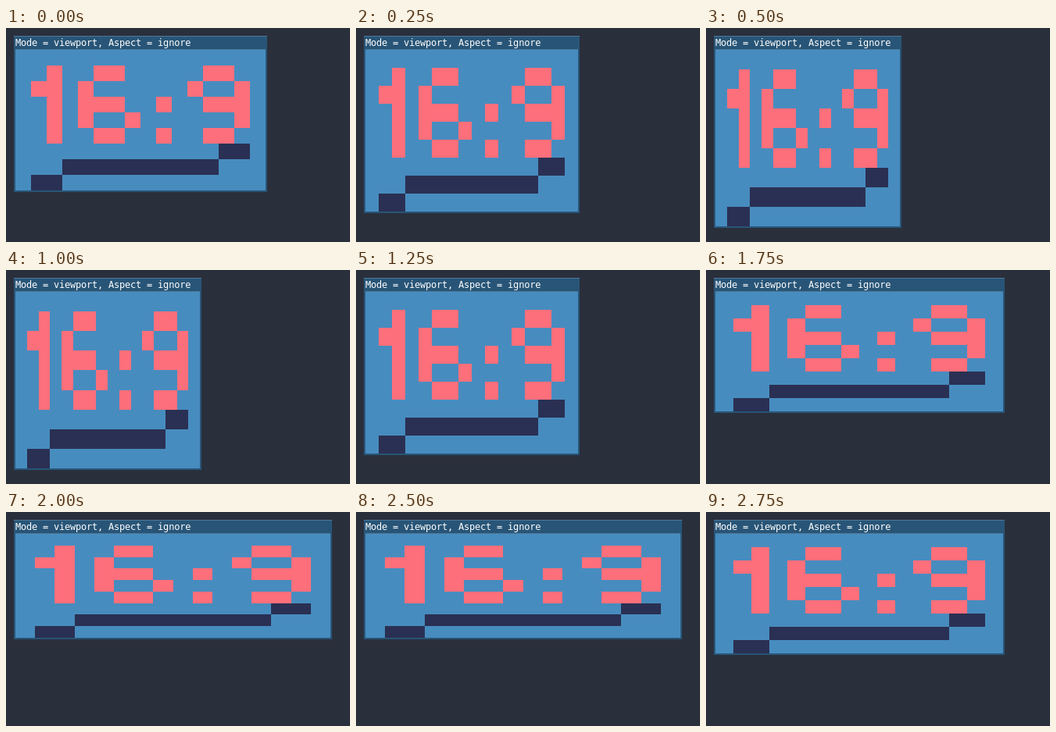
Animation of 440 by 274 pixels, one loop 3 s. Source, as an HTML page with a canvas:

```html
<!DOCTYPE html>
<html lang="en">
<head>
<meta charset="utf-8">
<title>Viewport resize</title>
<style>
html, body { margin: 0; width: 100%; height: 100%; overflow: hidden; background: #2a2f3c; }
canvas { display: block; }
</style>
</head>
<body>
<canvas id="stage" width="440" height="274"></canvas>
<script>
const ctx = document.getElementById('stage').getContext('2d', { alpha: false });

const LOOP = 3000, STEP = 250;
const LEFT = 10, TOP = 10, BAR = 18, EDGE = 2;
const TITLE = 'Mode = viewport, Aspect = ignore';
const COLOR = {
  desk: '#2a2f3c', frame: '#285577', line: '#4c7899',
  sky: '#478cbf', '#': '#fc6f7b', '=': '#2a3053'
};

// 16 x 9 low resolution picture
const PICTURE = [
  '................',
  '..#..##.....##..',
  '.##.#......#..#.',
  '..#.###..#..###.',
  '..#.#..#......#.',
  '..#..##..#..##..',
  '.............==.',
  '...==========...',
  '.==.............'
];

function box(color, x, y, w, h) {
  ctx.fillStyle = color;
  ctx.fillRect(x, y, w, h);
}

function drawTitle() {
  ctx.font = '12px "DejaVu Sans Mono", monospace';
  ctx.letterSpacing = '-0.22px';
  ctx.fillStyle = '#ffffff';
  ctx.fillText(TITLE, LEFT + EDGE, 23);
}

function drawPicture(x, y, w, h) {
  const col = i => x + Math.round(i * w / 16);
  const row = i => y + Math.round(i * h / 9);
  box(COLOR.sky, x, y, w, h);
  PICTURE.forEach((cells, r) => [...cells].forEach((cell, c) => {
    if (cell === '.') return;
    box(COLOR[cell], col(c), row(r), col(c + 1) - col(c), row(r + 1) - row(r));
  }));
}

function draw(time) {
  const t = Math.floor((time % LOOP) / STEP) * STEP;
  const swing = Math.sin(t / LOOP * 2 * Math.PI);
  const w = Math.floor(320 - 96 * swing + 1e-6);
  const h = Math.min(233, Math.floor(180 + 54 * swing + 1e-6));
  const x = LEFT + EDGE, y = TOP + BAR;

  box(COLOR.desk, 0, 0, 440, 274);
  box(COLOR.frame, LEFT, TOP, w + 2 * EDGE, BAR + h + EDGE);
  box(COLOR.line, LEFT, TOP, w + 2 * EDGE, 1);
  box(COLOR.line, x, y - 1, w, 1);
  drawTitle();
  drawPicture(x, y, w, h);
}

const start = performance.now();
function tick() {
  draw(performance.now() - start);
  requestAnimationFrame(tick);
}
tick();
</script>
</body>
</html>
```
